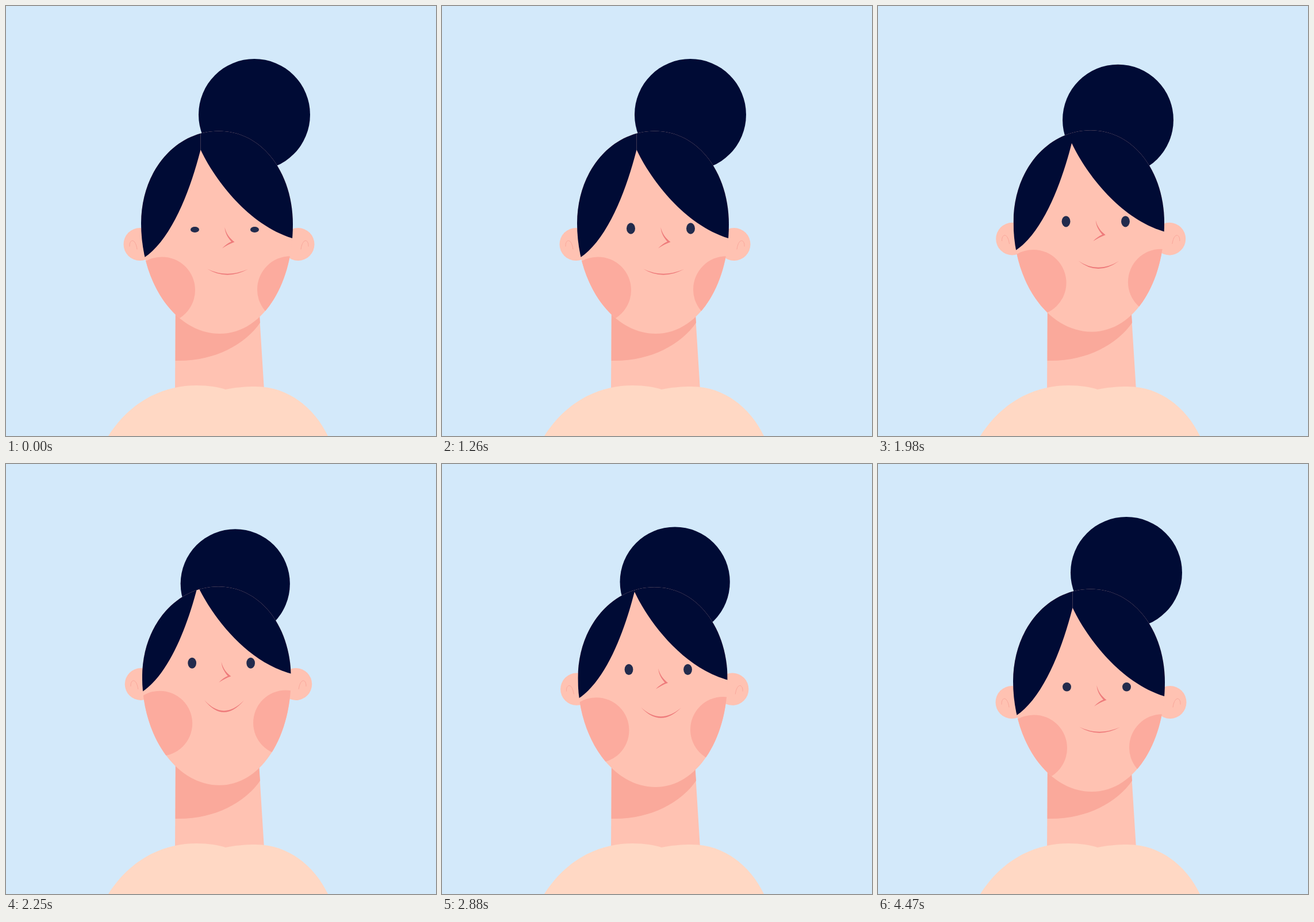
Recreate the animation shown at these times as an HTML page. Size 748 by 748 pixels, loop 4.5 s.

```html
<!DOCTYPE html>
<html lang="en">
<head>
<meta charset="utf-8">
<title>Nodding portrait</title>
<style>
  html, body { margin: 0; width: 100%; height: 100%; overflow: hidden; background: #d3e9fa; }
  svg { display: block; width: 100%; height: 100%; }
  .skin { fill: #ffc2b2; }
  .hair { fill: #000b35; }
  .blush { fill: #fcab9e; }
  .line { fill: #ee7b7b; }
  .eye { fill: #222b4d; }
  .fold { fill: none; stroke: #f9a79b; stroke-width: 1; stroke-linecap: round; }
</style>
</head>
<body>
<svg viewBox="0 0 748 748">
  <defs>
    <path id="skull" d="M235 378C235 288 294 217.5 370 217.5C446 217.5 499 290 499 380C499 486 445 570 372 570C296 570 235 484 235 378Z"/>
    <clipPath id="inHead"><use href="#skull"/></clipPath>
  </defs>

  <path class="skin" d="M295 500H438.5L449 668H294Z"/>
  <path fill="#faa99b" d="M295 500H438.5L442 551C415 590 360 619 294.6 617Z"/>
  <path fill="#ffd8c4" d="M178 748C215 690 270 660 332 660C352 660 370 663 382 667C395 664 415 662 435 662C490 662 536 698 560 748Z"/>

  <g id="head">
    <circle id="bun" class="hair" cx="432" cy="189" r="97"/>
    <g id="ears">
      <circle class="skin" cx="233" cy="414.5" r="28.5"/>
      <circle class="skin" cx="508" cy="414.5" r="28.5"/>
      <path class="fold" d="M215 418C214 406 225 402 228 423M526 418C527 406 516 402 513 423"/>
    </g>
    <use href="#skull" class="skin"/>
    <g clip-path="url(#inHead)">
      <g id="front">
        <circle class="blush" cx="271.2" cy="494.2" r="57.8"/>
        <circle class="blush" cx="494.8" cy="493" r="57.8"/>
        <path class="hair" d="M338.5 250C322 315 290 405 240 438L180 478V100H338.5Z"/>
        <path class="hair" d="M338.5 250C362 300 420 380 498 404L560 423V100H338.5Z"/>
      </g>
    </g>
    <g id="face">
      <ellipse class="eye" cx="328.5" cy="387" rx="7.5" ry="9.7"/>
      <ellipse class="eye" cx="432.5" cy="387" rx="7.5" ry="9.7"/>
      <path class="line" d="M380.5 385C383 396 389 404 397.5 410.5C390 413 383 417 376 421.5C381 416 387 412 392 410C386 403 381 395 380.5 385Z"/>
      <path id="mouth" class="line"/>
    </g>
  </g>
</svg>
<script>
  const LOOP = 4500, STEP = 30;
  const $ = id => document.getElementById(id);
  const [head, bun, ears, front, face, mouth] =
    ['head', 'bun', 'ears', 'front', 'face', 'mouth'].map($);
  const eyes = document.querySelectorAll('.eye');

  // Monotone cubic curve through [time, value] keys, flat at both ends.
  function curve(keys) {
    const rate = keys.slice(1).map(([t, v], i) => (v - keys[i][1]) / (t - keys[i][0]));
    const slope = keys.map((_, i) => {
      const a = rate[i - 1] || 0, b = rate[i] || 0;
      return a * b > 0 ? 2 * a * b / (a + b) : 0;
    });
    return t => {
      if (t <= keys[0][0]) return keys[0][1];
      const i = keys.findIndex(k => k[0] >= t) - 1;
      if (i < 0) return keys[keys.length - 1][1];
      const [t0, v0] = keys[i], [t1, v1] = keys[i + 1];
      const h = t1 - t0, x = (t - t0) / h, y = 1 - x;
      return v0 * y * y * (1 + 2 * x) + v1 * x * x * (3 - 2 * x)
        + h * x * y * (slope[i] * y - slope[i + 1] * x);
    };
  }

  const tilt = curve([[1230, 0], [1740, 0.002], [1980, 0.185], [2250, 0.625],
    [2550, 1.02], [2610, 1], [2850, 0.5], [3240, 0]]);
  const swing = curve([[1230, 0], [1500, 0.012], [1770, 0.09], [1980, 0.25],
    [2250, 0.57], [2550, 1.02], [2610, 1], [2850, 0.51], [3240, 0]]);

  const ease = x => x < 0.5 ? 4 * x ** 3 : 1 - 4 * (1 - x) ** 3;

  // Eye opening: closes across the loop seam, then opens again.
  function lid(t) {
    const u = (t + 120) % LOOP;
    if (u >= 450) return 1;
    return 1 - 0.97 * ease(u < 240 ? u / 240 : (450 - u) / 210);
  }

  const move = (el, x, y) => el.setAttribute('transform', `translate(${x} ${y})`);

  function draw(t) {
    const p = tilt(t), q = swing(t), open = lid(t);
    const k = 1 - 0.031 * p;
    head.setAttribute('transform',
      `translate(333 ${217.5 - 7 * p}) scale(${k}) translate(-333 -217.5)`);
    move(bun, -56 * q, 41.5 * q);
    move(ears, -0.5 * p, -38 * p);
    move(front, -8 * p, -54 * p);
    move(face, -8 * p, -54 * p);

    for (const eye of eyes) {
      eye.setAttribute('cy', 391 - 4 * open);
      eye.setAttribute('ry', 9.7 * open);
    }

    const smile = Math.min(1, 1.6 * p);
    const y = 457.3 - 5 * smile, low = 478 + 18 * smile, high = low - 4 - 1.5 * smile;
    mouth.setAttribute('d', `M350 ${y}Q384 ${low} 421 ${y + 0.5}Q384 ${high} 350 ${y}Z`);
  }

  function tick() {
    const t = performance.now() % LOOP;
    draw(Math.floor(t / STEP) * STEP);
    requestAnimationFrame(tick);
  }
  tick();
</script>
</body>
</html>
```
